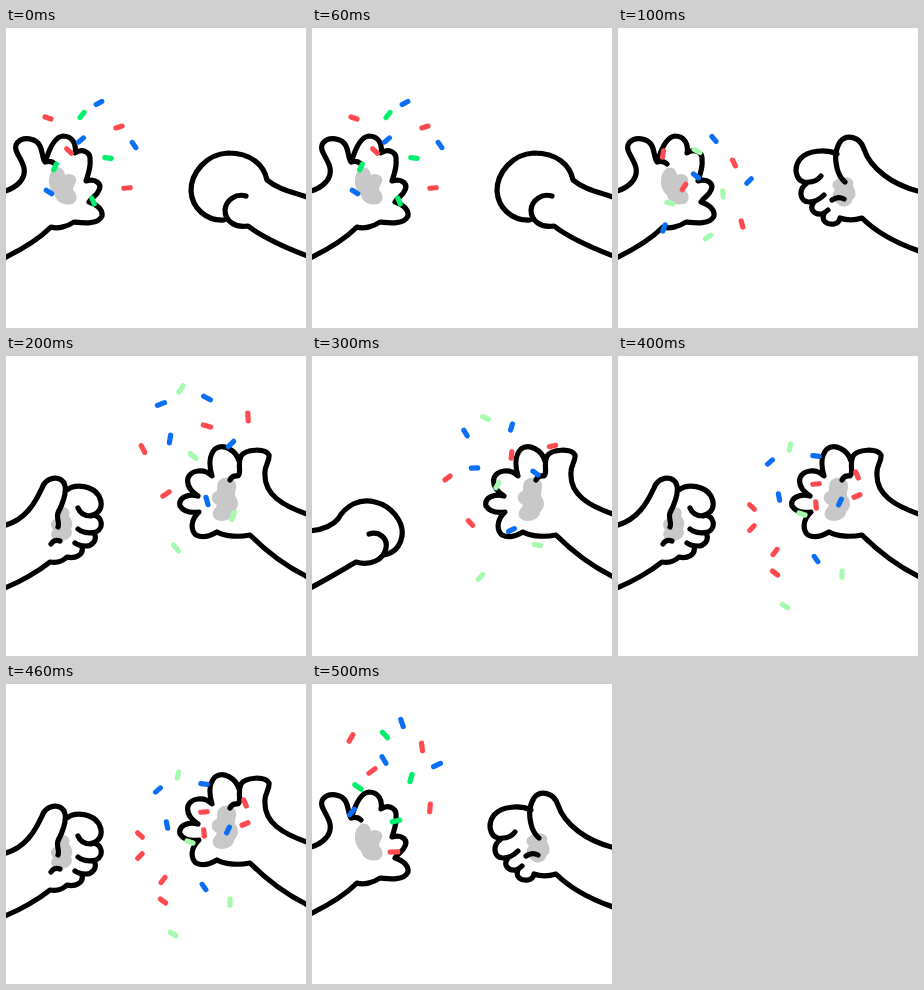
Animation, 300 px wide and 300 px high, one loop 0.6 s. Source, as an HTML page:

```html
<!DOCTYPE html>
<html lang="en">
<head>
<meta charset="utf-8">
<title>Hands and confetti</title>
<style>
  html, body { margin: 0; height: 100%; overflow: hidden; background: #fff; }
  svg { display: block; width: 100%; height: 100%; }
  path { fill: none; stroke: #000; stroke-width: 5.2; stroke-linecap: round; stroke-linejoin: round; }
  .palm { fill: #c8c8c8; stroke: none; }
  g { visibility: hidden; }
  g.on { visibility: visible; }
</style>
</head>
<body>
<svg viewBox="0 0 300 300">
  <g id="leftOpen">
    <path class="palm" d="M46 143C50 137 58 139 59 147C64 144 72 148 70 154C68 158 67 159 67 162C72 166 72 174 66 176C56 178 50 173 49 167C42 162 41 149 46 143Z"/>
    <path d="M-4 164C11 160 20 151 18 140C16 130 6 122 11 115C17 108 30 110 34 118C37 124 36 130 39 134Q45 132 49 136M40 132C43 122 48 109 57 108C66 108 71 116 69 125C76 120 85 124 84 132C85 140 82 146 80 153C90 150 96 156 93 162C91 168 86 169 83 174C90 176 97 181 96 188C92 197 77 195 68 194C61 199 51 201 45 199C34 210 15 222 -4 231"/>
  </g>
  <g id="leftThumb">
    <path class="palm" d="M50 153C58 148 66 153 63 160C68 166 66 170 65 173C69 180 60 186 54 184C46 186 43 178 47 174C43 168 46 164 49 163Z"/>
    <path d="M-4 170C20 165 30 145 36 132C40 121 53 119 58 127C62 135 56 149 52 157C50 162 54 167 52 171M61 134C70 127 87 130 93 140C98 150 94 157 85 160C78 160 74 157 72 152M86 159C97 160 98 172 90 176C82 178 75 176 72 173M88 177C92 184 86 190 80 190Q73 190 69 187M76 191C78 199 69 203 61 201C56 206 50 207 44 206C34 214 15 226 -4 233M45 188Q48 183 54 185"/>
  </g>
  <g id="leftFist">
    <path d="M-4 175C12 174 20 170 26 163C34 149 48 142 63 146C80 150 92 166 90 180C88 191 82 197 72 199M57 178C67 175 76 182 74 192C72 204 58 210 44 206C30 214 12 225 -4 233"/>
  </g>
  <g id="rightOpen">
    <path class="palm" d="M214 124C222 118 232 124 230 132C229 136 229 137 229 140C234 146 232 153 228 156C228 164 214 168 208 162C204 156 210 152 211 149C204 146 204 137 211 135C211 130 211 126 214 124Z"/>
    <path d="M304 159C276 150 258 138 259 118C258 110 264 105 263 99C259 92 240 93 235 100C231 109 236 116 232 120Q226 119 224 124M233 105C230 94 217 87 209 93C203 99 203 110 206 120C198 112 185 114 182 122C180 130 186 136 192 140C182 137 172 142 174 150C178 156 186 157 193 156C185 163 184 174 190 179C198 183 206 179 211 176C220 181 234 181 244 179C258 193 276 209 304 222"/>
  </g>
  <g id="rightThumb">
    <path class="palm" d="M218 152C226 146 238 150 235 158C239 164 238 170 234 172C234 178 224 181 220 176C213 172 214 165 217 162C213 158 214 154 218 152Z"/>
    <path d="M304 164C275 158 252 140 246 121C242 108 228 106 222 114C217 122 217 132 219 140Q221 149 227 154M219 126C208 121 190 122 182 131C175 140 178 152 186 154C194 155 200 152 203 148M188 156C180 162 182 174 191 174C198 174 203 170 206 167M196 174C191 180 195 187 204 186Q208 184 210 182M206 186C203 193 209 197 216 196Q221 195 222 190C230 193 238 192 244 190C258 204 280 216 304 224M214 172Q220 168 226 171"/>
  </g>
  <g id="rightFist">
    <path d="M304 170C287 164 273 162 261 152C258 137 245 125 222 125C200 126 185 145 185 163C186 180 200 193 218 192M240 168C230 165 220 172 219 182C219 194 230 200 242 198C255 208 280 220 304 229"/>
  </g>
</svg>
<script>
const svg = document.querySelector('svg');
const colors = { r: '#ff4b50', b: '#0a6ff5', g: '#a6fab0', vivid: '#00f06c' };
const SPIN = 80, TILT_GAP = 12;

// Pieces are start points in order of tilt: colour, x, y and, if short-lived, steps to live.
const left = {
  tilt: 35, fall: 36, drift: 3,
  pieces: [
    ['g', 46, 103], ['g', 73, 51], ['b', 72, 76], ['b', 90, 39], ['r', 110, 63], ['r', 118, 124],
    ['g', 99, 94], ['r', 39, 54], ['b', 40, 128], ['r', 60, 87], ['b', 125, 81], ['g', 84, 137],
    ['r', 82, 168, 1]
  ]
};
const right = {
  tilt: 15, fall: 29, drift: -1.5,
  pieces: [
    ['r', 201, 70], ['b', 201, 42], ['g', 187, 100], ['g', 170, 192], ['r', 137, 93], ['b', 201, 145],
    ['r', 242, 61], ['b', 164, 83], ['g', 227, 160], ['g', 175, 33], ['b', 225, 88], ['r', 160, 138],
    ['b', 155, 48]
  ]
};

function add(parent, tag, attrs = {}) {
  const el = document.createElementNS('http://www.w3.org/2000/svg', tag);
  for (const name in attrs) el.setAttribute(name, attrs[name]);
  return parent.appendChild(el);
}

function confetti(burst, step) {
  const group = add(svg, 'g');
  const half = step ? 3.2 : 3.8;
  const dash = (color, x, y, angle) => add(group, 'path', {
    d: `M${-half} 0H${half}`,
    transform: `translate(${x} ${y}) rotate(${angle})`,
    style: `stroke: ${colors[color]}`
  });
  const vivid = burst === left && step < 2;
  burst.pieces.forEach(([color, x0, y0, life = 3], i) => {
    if (step >= life) return;
    const x = x0 + burst.drift * step;
    const y = y0 + burst.fall * step;
    const angle = burst.tilt + TILT_GAP * i + SPIN * step;
    dash(vivid && color === 'g' ? 'vivid' : color, x, y, angle);
    // Red pieces split in two at the end of the right burst.
    if (burst === right && step === 2 && color === 'r') dash('r', x, y + 21, angle + 90);
  });
  return group;
}

const hand = id => document.getElementById(id);
const scenes = [0, 1, 2, 3, 4, 5].map(i => {
  const step = i % 3, onLeft = i < 3;
  const [open, closed] = onLeft ? ['left', 'right'] : ['right', 'left'];
  return [
    hand(open + 'Open'),
    hand(closed + (step === 1 ? 'Fist' : 'Thumb')),
    confetti(onLeft ? left : right, step)
  ];
});

// The loop opens on the second step of the left burst.
let shown = [];
function draw() {
  const scene = scenes[(Math.floor(performance.now() / 100) + 1) % 6];
  if (scene !== shown) {
    shown.forEach(g => g.classList.remove('on'));
    scene.forEach(g => g.classList.add('on'));
    shown = scene;
  }
  requestAnimationFrame(draw);
}
draw();
</script>
</body>
</html>
```
